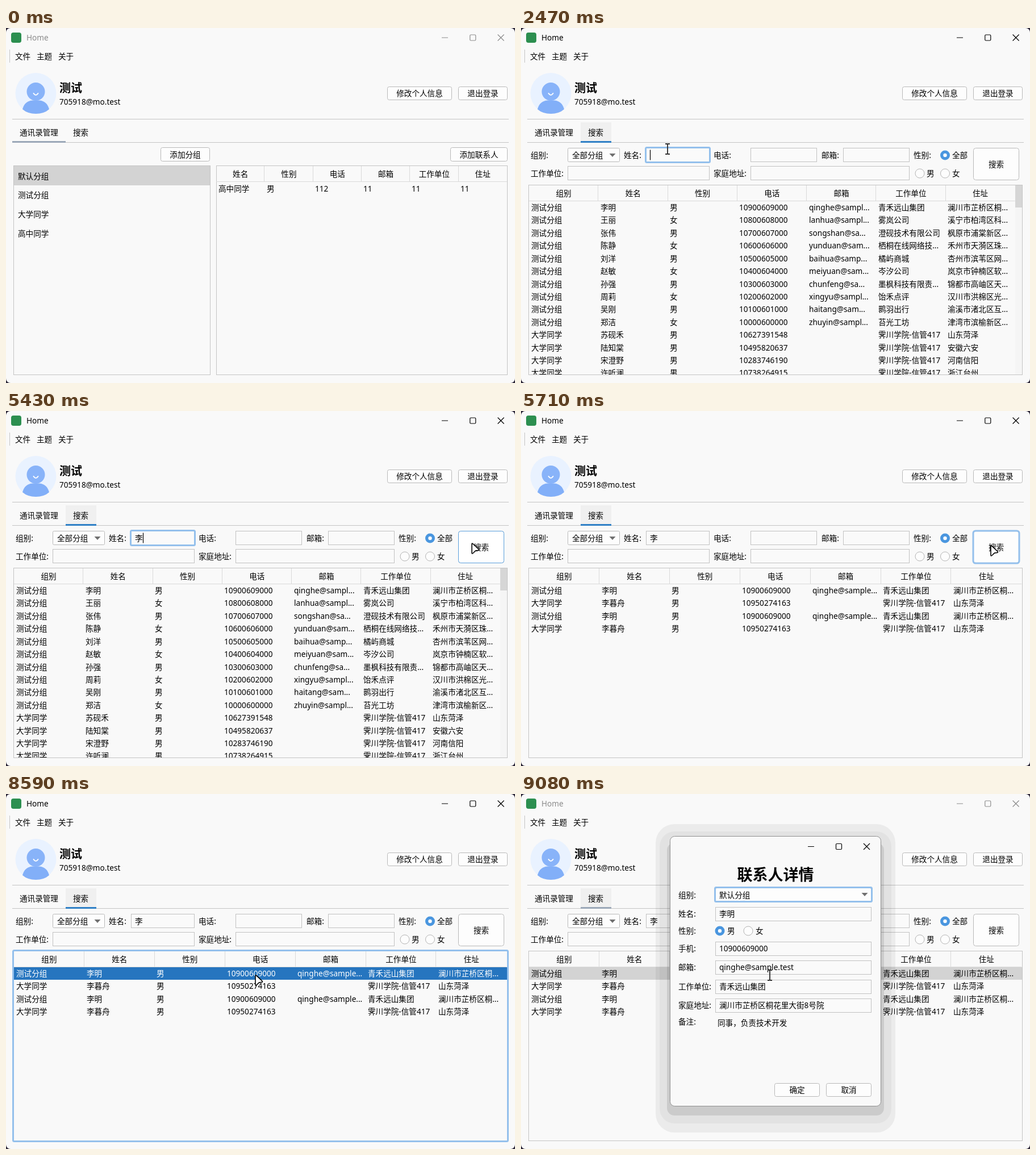
An HTML page for the animation above (9.49 s loop, 896 px wide and 625 px high).

```html
<!DOCTYPE html>
<html lang="zh">
<head>
<meta charset="utf-8">
<title>Home</title>
<style>
html,body{margin:0;width:100%;height:100%;overflow:hidden;background:#2b2638}
svg{display:block;width:896px;height:625px;color:#000;font:13.6px 'Noto Sans','Noto Sans CJK SC','Noto Sans CJK',sans-serif}
text{fill:currentColor;white-space:pre}
.mid{text-anchor:middle}
.bold{font-weight:700}
.line{fill:none;stroke:#c4c4c4}
.faint{fill:none;stroke:#dadada}
.field{fill:#fafafa;stroke:#c2c2c2}
.btn{fill:#fdfdfd;stroke:#b9b9b9}
.ring{fill:none;stroke:#94c0ec;stroke-width:3}
.icon{fill:none;stroke:currentColor;stroke-width:1.2}
.off{fill:#fdfdfd;stroke:#b3b3b3}
.on{fill:#4a96df}
.hot{fill:#fff;stroke:#5b9fdc}
#dialog{transform-origin:372px 248px}
#ime{color:#ececec;font-size:16px}
</style>
</head>
<body>
<script>
const LOOP = 9490;

// ---- drawing helpers ----
const text = (x, y, s, cls = '', extra = '') =>
  `<text x="${x}" y="${Math.round(y + 5)}" class="${cls}" ${extra}>${s}</text>`;
const box = (x, y, x2, y2, cls, r = 0, extra = '') =>
  `<rect x="${x + .5}" y="${y + .5}" width="${x2 - x - 1}" height="${y2 - y - 1}" rx="${r}" class="${cls}" ${extra}/>`;
const fill = (x, y, x2, y2, color, r = 0, extra = '') =>
  `<rect x="${x}" y="${y}" width="${x2 - x}" height="${y2 - y}" rx="${r}" fill="${color}" ${extra}/>`;
const path = (d, cls = '', extra = '') => `<path d="${d}" class="${cls}" ${extra}/>`;
const group = (id, ...parts) => `<g id="${id}">${parts.join('')}</g>`;
const button = (x, y, x2, y2, s) =>
  box(x, y, x2, y2, 'btn', 3) + text((x + x2) / 2, (y + y2) / 2, s, 'mid');
const ring = (id, x, y, x2, y2, r = 3) =>
  group(id, box(x, y, x2, y2, 'ring', r));
const arrowDown = (x, y) => path(`M${x - 5.5} ${y - 3}h11l-5.5 6z`, '', 'fill="#707070"');
const radio = (x, y, on) => on
  ? `<circle cx="${x}" cy="${y}" r="8.5" class="on"/><circle cx="${x}" cy="${y}" r="3.2" fill="#fff"/>`
  : `<circle cx="${x}" cy="${y}" r="8" class="off"/>`;
const controls = (x, y, gap) =>
  path(`M${x - 5.5} ${y}h11M${x + 2 * gap - 5.5} ${y - 5.5}l11 11m0-11l-11 11`, 'icon') +
  `<rect x="${x + gap - 5}" y="${y - 5}" width="10" height="10" rx="1.5" class="icon"/>`;

function header(x, y, w, names) {
  const end = x + w * names.length;
  return path(`M${x} ${y + 27.5}H${end}`, 'faint') + names.map((n, i) =>
    text(x + w * (i + .5), y + 14, n, 'mid') +
    (i ? path(`M${Math.round(x + w * i) - .5} ${y}v27`, 'faint') : '')).join('');
}
const cells = (x, y, w, row) => row.map((s, i) => text(Math.round(x + 3.6 + w * i), y, s)).join('');
const rowY = i => 316 + 22.42 * i;

// ---- data ----
const heads = ['组别', '姓名', '性别', '电话', '邮箱', '工作单位', '住址'];
const people = [
  ['李明', 'qinghe@sampl...', '青禾远山集团', '澜川市芷桥区桐...'],
  ['王丽', 'lanhua@sampl...', '雾岚公司', '溪宁市柏湾区科...'],
  ['张伟', 'songshan@sa...', '澄砚技术有限公司', '枫原市浦棠新区...'],
  ['陈静', 'yunduan@sam...', '栖桐在线网络技...', '禾州市天漪区珠...'],
  ['刘洋', 'baihua@samp...', '橘屿商城', '杏州市滨苇区网...'],
  ['赵敏', 'meiyuan@sam...', '岑汐公司', '岚京市钟楠区软...'],
  ['孙强', 'chunfeng@sa...', '墨枫科技有限责...', '锦都市高岫区天...'],
  ['周莉', 'xingyu@sampl...', '饴禾点评', '汉川市洪棉区光...'],
  ['吴刚', 'haitang@sam...', '鹮羽出行', '渝溪市渚北区互...'],
  ['郑洁', 'zhuyin@sampl...', '苔光工坊', '津湾市滨榆新区...']
].map(([name, mail, work, home], i) => {
  const d = 9 - i;
  return ['测试分组', name, i % 2 ? '女' : '男', `10${d}0060${d}000`, mail, work, home];
});
const school = '霁川学院-信管417';
const mate = (name, tel, home) => ['大学同学', name, '男', tel, '', school, home];
const all = [...people,
  mate('苏砚禾', '10627391548', '山东菏泽'), mate('陆知棠', '10495820637', '安徽六安'),
  mate('宋澄野', '10283746190', '河南信阳'), mate('许听澜', '10738264915', '浙江台州')];
const first = [...people[0]];
first[4] = 'qinghe@sample...';
const second = mate('李暮舟', '10950274163', '山东菏泽');
const found = [first, second, first, second];

// ---- window ----
const frame =
  fill(0, 0, 896, 625, '#f9f9f9', 8) + fill(9, 8, 27, 26, '#2c8f50', 4) +
  group('chrome', text(36, 17, 'Home'), controls(772.5, 17, 49.3)) +
  path('M6.5 38v23', 'line') + text(16, 50, '文件') + text(54, 50, '主题') + text(92, 50, '关于') +
  '<circle cx="52.5" cy="115" r="36" fill="#e9f2ff"/>' +
  path('M29 143Q33 128 47 127.5H58Q72 128 76 143Q67 151 52.5 151Q38 151 29 143z', '', 'fill="#82aff8"') +
  '<circle cx="52.5" cy="112" r="16" fill="#88b3f9"/>' +
  path('M48.5 115q4 6 8 0', '', 'fill="none" stroke="#fff" stroke-width="2" stroke-linecap="round"') +
  text(94, 108, '测试', 'bold', 'font-size="20"') + text(94, 130, '705918@mo.test') +
  button(671, 103, 785, 127, '修改个人信息') + button(796, 103, 883, 127, '退出登录') +
  path('M11 160.5H885M11 201.5H885', 'line') +
  group('tabfill', fill(105, 166, 159, 202, '#f0f0f0')) +
  text(24, 184, '通讯录管理') + text(118, 184, '搜索');

const home = group('home',
  fill(11, 199, 105, 202, '#9ba8b8'),
  button(272, 210, 359, 235, '添加分组'), button(782, 210, 883, 235, '添加联系人'),
  box(13, 242, 360, 611, 'line'), fill(14, 243, 359, 277, '#d3d3d3'),
  ...['默认分组', '测试分组', '大学同学', '高中同学'].map((s, i) => text(21, 260.5 + 33.7 * i, s)),
  box(370, 242, 883, 611, 'line'),
  header(370, 243, 85.3, ['姓名', '性别', '电话', '邮箱', '工作单位', '住址']),
  cells(370, 283, 85.2, ['高中同学', '男', '112', '11', '11', '11']));

const form =
  text(17, 224, '组别:') + box(82, 211, 174, 236, 'btn', 2) + text(90, 224, '全部分组') + arrowDown(161, 224) +
  text(181, 224, '姓名:') + box(220, 211, 332, 236, 'field') +
  text(339, 224, '电话:') + box(404, 211, 521, 236, 'field') +
  text(529, 224, '邮箱:') + box(567, 211, 684, 236, 'field') +
  text(691, 224, '性别:') + radio(746.5, 224, true) + text(759, 224, '全部') +
  text(17, 256, '工作单位:') + box(82, 243, 332, 268, 'field') +
  text(339, 256, '家庭地址:') + box(404, 243, 684, 268, 'field') +
  radio(702, 256) + text(714, 256, '男') + radio(746.5, 256) + text(759, 256, '女') +
  group('overfemale', '<circle cx="746.5" cy="256" r="8" class="hot"/>') +
  box(796, 211, 877, 268, 'btn', 4) + group('overbtn', box(796, 211, 877, 268, 'hot', 4)) +
  ring('btnring', 795.5, 210.5, 877.5, 268.5, 4) + text(836.5, 240, '搜索', 'mid') +
  ring('namering', 219, 210, 333, 237, 2);

const caret = (id, x) => group(id, path(`M${x + .5} 214.5v18`, 'icon'));
const typed =
  group('l', text(228, 224, 'l'), path('M228 232.5h4', 'icon', 'stroke-dasharray="1 1"')) +
  group('li', text(228, 224, 'li'), path('M228 232.5h7', 'icon', 'stroke-dasharray="1 1"')) +
  group('word', text(227, 224, '李')) +
  caret('caret0', 227) + caret('caret1', 232) + caret('caret2', 235) + caret('caret3', 241);

const search = group('search',
  fill(105, 199, 159, 202, 'currentColor', 0, 'id="mark"'), form, typed,
  '<g clip-path="url(#grid)">',
  group('all', header(14, 277, 122.25, heads),
    ...all.map((r, i) => cells(14, rowY(i), 122.25, r)),
    fill(870, 277, 882, 610, '#f5f5f5'), fill(870, 277, 882, 316, '#d6d6d6')),
  group('found', header(14, 277, 123.9, heads),
    group('pick', fill(14, 305, 882, 327, '#d3d3d3'), group('pickblue', fill(14, 305, 882, 327, '#2675bf'))),
    ...found.map((r, i) => `<g id="row${i}">${cells(14, rowY(i), 123.9, r)}</g>`)),
  '</g>', box(13, 276, 883, 611, 'line'), ring('tablering', 12, 275, 884, 612, 2));

// ---- input method bar ----
const candidates = (id, s) => group(id, ...[...s].map((c, i) => text(252.5 + 73.8 * i, 255, `${i + 1} ${c}`)));
const ime = group('ime',
  ...[6, 4, 2].map(n => fill(235 - n, 237 - n, 882 + n, 276 + n, '#000', 8 + n, 'opacity=".07"')),
  box(235, 235, 882, 273, '', 7, 'fill="#2b2b2b" stroke="#454545"'),
  fill(240, 239, 309, 269, '#3a3a3a', 4), fill(240, 245, 243, 263, '#4cc2ff', 1.5),
  candidates('cand1', '来了里两老拉路'), candidates('cand2', '李丽里莉利梨离'),
  path('M757.5 236v36M813.5 236v36M849.5 236v36', '', 'stroke="#383838"'),
  path('M777 249.5v9l-7-4.5z', '', 'fill="#6a6a6a"'), path('M797.5 249.5v9l7-4.5z', '', 'fill="#fff"'),
  path('M832 247h-4q-2 0-2 2v11q0 2 2 2h11q2 0 2-2v-4M860 251l6.5 6.5 6.5-6.5', 'icon'),
  path('M837.5 256l-5-5.2q-1.8-3 .8-4.9 2.3-1 4.2 1.3 1.9-2.3 4.2-1.3 2.6 1.9.8 4.9z', '', 'fill="#fff"'));

// ---- details dialog ----
const shade = (side, top, bottom, alpha) =>
  fill(262 - side, 74 - top, 634 + side, 550 + bottom, '#000', 8 + side, `opacity="${alpha}"`);
const entry = (y, label, value) =>
  text(277, y, label) + box(342, Math.round(y) - 12, 617, Math.round(y) + 13, 'field') + text(349, y, value);
const dialog = group('dialog',
  shade(25, 21, 46, .055), shade(18, 8, 30, .035), shade(5, -12, 16, .1),
  box(262, 74, 634, 550, '', 8, 'fill="#f9f9f9" stroke="#8f8f8f"'),
  controls(510.5, 92.5, 49), text(448, 147, '联系人详情', 'mid bold', 'font-size="27"'),
  text(277, 178, '组别:'), box(342, 165, 617, 190, 'btn', 2), text(349, 178, '默认分组'),
  arrowDown(605, 177), box(341, 164, 618, 190, 'ring', 2),
  entry(211, '姓名:', '李明'),
  text(277, 241, '性别:'), radio(350, 241, true), text(363, 241, '男'), radio(400, 241), text(413, 241, '女'),
  entry(271.5, '手机:', first[3]), entry(305, '邮箱:', 'qinghe@sample.test'),
  entry(339, '工作单位:', first[5]), entry(372, '家庭地址:', '澜川市芷桥区桐花里大街8号院'),
  text(277, 401, '备注:'), text(346, 403, '同事，负责技术开发'),
  button(446, 509, 526, 533, '确定'), button(537, 509, 617, 533, '取消'));

const pointer = group('pointer',
  group('arrow', path('M1 1V16.5Q1 19 2.8 17.5L7 13.4Q8 12.6 9.5 12.6L12 12.4Q14.5 11.8 12.7 10L3 .8Q1-.6 1 1Z',
    '', 'fill="#fff" stroke="#000" stroke-width="1.6"')),
  group('beam', path('M-4-9h3l1 1 1-1h3M0-8V8M-4 9h3l1-1 1 1h3', '', 'fill="none" stroke="#333" stroke-width="1.9"')));

document.body.innerHTML =
  `<svg viewBox="0 0 896 625"><clipPath id="grid">${fill(14, 276, 882, 610, '#000')}</clipPath>` +
  frame + home + search + ime + dialog + pointer + '</svg>';

// ---- timeline: [ms, declarations] lists become CSS keyframes ----
let css = '';
function keys(id, steps, ease = 'step-end') {
  const body = steps.map(([ms, s]) => `${(ms / LOOP * 100).toFixed(4)}%{${s}}`).join('');
  css += `@keyframes ${id}-k{${body}}#${id}{animation:${id}-k ${LOOP}ms ${ease} infinite}`;
}
function show(id, ...spans) {
  const steps = spans[0][0] ? [[0, 'opacity:0']] : [];
  for (const [a, b] of spans) {
    steps.push([a, 'opacity:1']);
    if (b < LOOP) steps.push([b, 'opacity:0']);
  }
  keys(id, steps);
}

keys('chrome', [[0, 'color:#8c8c8c'], [1380, 'color:#000'], [8840, 'color:#8c8c8c']]);
keys('mark', [[0, 'color:#2f80c6'], [8840, 'color:#9ba8b8']]);
show('home', [0, 1380]);
show('search', [1380, LOOP]);
show('tabfill', [1830, LOOP]);
show('all', [1380, 5710]);
show('found', [5710, LOOP]);
show('namering', [2470, 5590]);
show('overbtn', [5340, 5590]);
show('btnring', [5590, 8590]);
show('overfemale', [7790, 7880]);
show('pick', [8590, LOOP]);
show('pickblue', [8590, 8840]);
show('tablering', [8590, 8840]);
keys('row0', [[0, 'color:#000'], [8590, 'color:#fff'], [8840, 'color:#000']]);

show('l', [3720, 3960]);
show('li', [3960, 4370]);
show('word', [4370, LOOP]);
show('caret0', [2470, 2970], [3470, 3720]);
show('caret1', [3720, 3960]);
show('caret2', [3960, 4370]);
show('caret3', [4370, 4870], [5370, 5590]);
keys('ime', [[0, 'opacity:0'], [3720, 'opacity:.6'], [3760, 'opacity:1'], [4370, 'opacity:0']]);
show('cand1', [3720, 3960]);
show('cand2', [3960, 4370]);

keys('dialog', [[0, 0, .9], [8840, .3, .905], [8880, .74, .9345], [8960, .96, .98],
  [9000, 1, .991], [9040, 1, .997], [9080, 1, 1]]
  .map(([ms, o, s]) => [ms, `opacity:${o};transform:scale(${s})`]));

show('arrow', [410, 2190], [3720, 4870], [4930, 5000], [5230, 8840]);
show('beam', [2190, 3720], [4870, 4930], [5000, 5230], [8840, LOOP]);
keys('pointer', [[0, 309, 570], [410, 309, 570], [490, 281, 488], [570, 249, 402], [650, 209, 307],
  [730, 174, 216], [810, 159, 197], [930, 153, 189], [1050, 151, 187], [1800, 151, 187],
  [1910, 174, 190], [2030, 206, 197], [2110, 237, 206], [2270, 258, 213], [4840, 258, 213],
  [4950, 340, 218], [5070, 490, 232], [5190, 639, 245], [5310, 766, 240], [5430, 819, 233],
  [5550, 826, 237], [7785, 826, 237], [7790, 752, 261], [7865, 752, 261], [8030, 610, 285],
  [8190, 505, 306], [8350, 450, 317], [8550, 438, 319], [LOOP, 438, 319]]
  .map(([ms, x, y]) => [ms, `transform:translate(${x}px,${y}px)`]), 'linear');

document.head.appendChild(document.createElement('style')).textContent = css;
</script>
</body>
</html>
```
